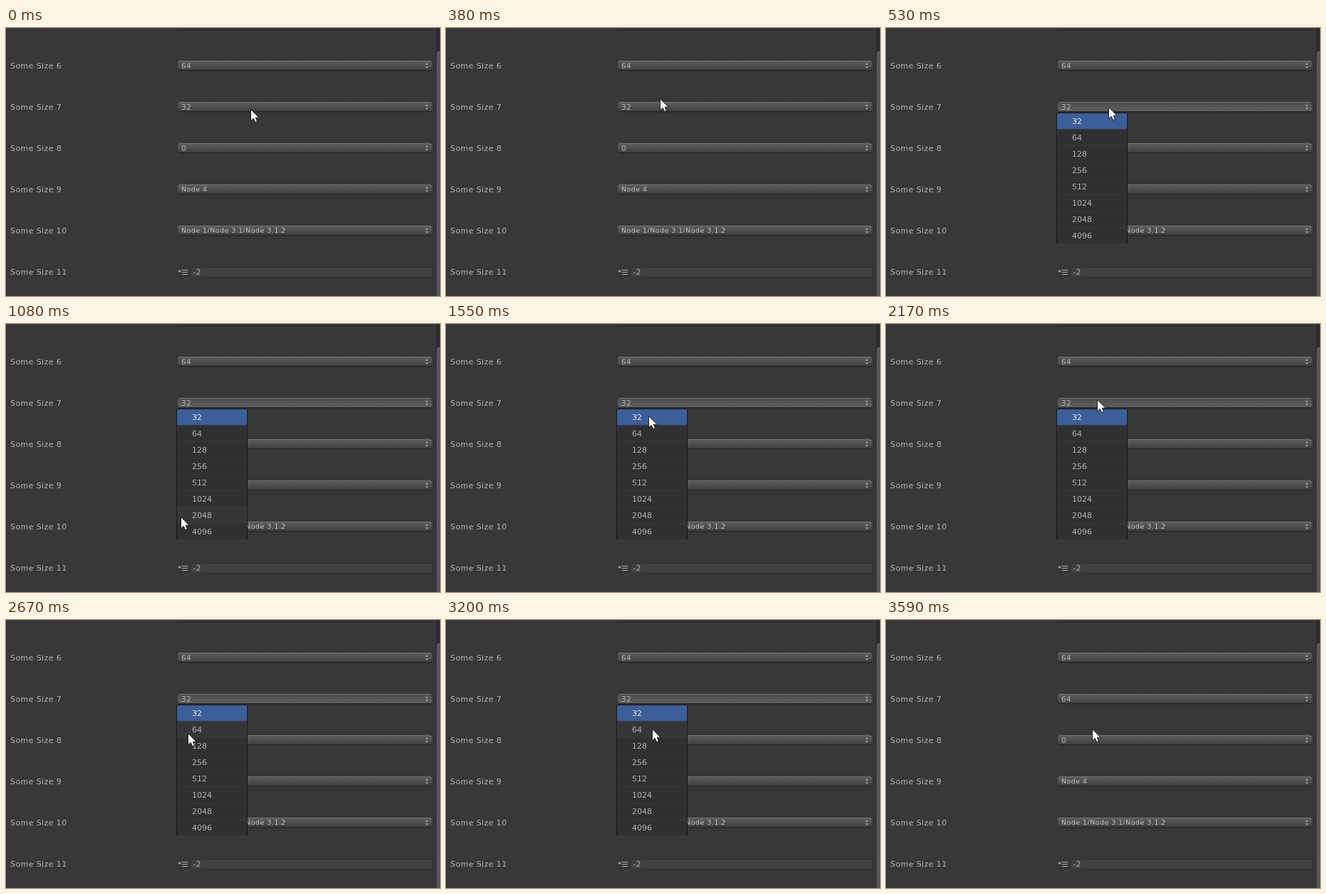
Write an HTML page that moves like this. It is 609 px wide and 377 px high and loops after 4430 ms.

```html
<!DOCTYPE html>
<html lang="en">
<head>
<meta charset="utf-8">
<title>Size popup</title>
<style>
html, body { margin: 0; width: 100%; height: 100%; overflow: hidden; background: #383838; }
svg { display: block; width: 609px; height: 377px; }
text { font: 11px "DejaVu Sans", sans-serif; fill: #b4b4b4; white-space: pre; }
.label { letter-spacing: .4px; }
.value { font-size: 10.5px; letter-spacing: .2px; }
.node { font-size: 9.5px; letter-spacing: .44px; fill: #c4c4c4; }
rect { shape-rendering: crispEdges; }
.round { shape-rendering: auto; }
</style>
</head>
<body>
<svg id="stage" viewBox="0 0 609 377">
  <defs>
    <linearGradient id="idle" x2="0" y2="1">
      <stop stop-color="#5e5e5e"/><stop offset="1" stop-color="#404040"/>
    </linearGradient>
    <linearGradient id="pressed" x2="0" y2="1">
      <stop stop-color="#4d4d4d"/><stop offset="1" stop-color="#5e5e5e"/>
    </linearGradient>
    <linearGradient id="thumb">
      <stop stop-color="#5c5c5c"/><stop offset="1" stop-color="#484848"/>
    </linearGradient>
  </defs>
</svg>
<script>
const LOOP = 4430, OPEN = 530, CLOSE = 3510, COMMIT = 3590;
const TICK = 78, LEAD = 16; // the pointer is sampled once per tick
const GAP = 58, ITEM = 23, ITEMS = 8, MENU_TOP = 120;

// key points of the pointer: tick, x, y
const KEYS = [
  [0, 343, 114], [5, 300, 99], [7, 312, 111], [10, 312, 111],
  [15, 232, 290], [17, 223, 240], [20, 284, 129], [22, 346, 168],
  [26, 215, 184], [28, 296, 106], [29, 338, 126], [31, 255, 159],
  [32, 274, 162], [34, 255, 159], [35, 229, 160], [38, 319, 149],
  [40, 254, 155], [41, 289, 153]
];

const stage = document.getElementById("stage");

function add(parent, tag, attrs, content) {
  const el = document.createElementNS("http://www.w3.org/2000/svg", tag);
  for (const key in attrs) el.setAttribute(key, attrs[key]);
  if (content !== undefined) el.textContent = content;
  parent.append(el);
  return el;
}

const box = (parent, x, y, width, height, fill) =>
  add(parent, "rect", { x, y, width, height, fill });
const write = (parent, x, y, content, cls = "") =>
  add(parent, "text", { x, y, class: cls }, content);

function popup(mid, value, cls) {
  const round = { x: 241, y: mid - 7, width: 357, rx: 3, class: "round" };
  add(stage, "rect", { ...round, height: 14.5, fill: "#262626" });
  const face = add(stage, "rect", { ...round, height: 13, fill: "url(#idle)" });
  box(stage, 243, mid - 7, 353, 1, "#747474");
  add(stage, "path", {
    d: `M588.5 ${mid - 1}l2 -3l2 3zM588.5 ${mid + 1}l2 3l2 -3z`,
    fill: "#a0a0a0"
  });
  const text = write(stage, 246, mid + (cls === "node" ? 3 : 4), value, cls);
  return { face, text };
}

function field(mid, value) {
  add(stage, "path", { d: `M241 ${mid - 2}h5l-2.5 3z`, fill: "#b4b4b4" });
  for (const dy of [-3, 0, 3]) box(stage, 247, mid + dy, 8, 1, "#a8a8a8");
  box(stage, 259, mid - 7, 340, 15, "#303030");
  box(stage, 260, mid - 6, 338, 13, "#414141");
  write(stage, 262.5, mid + 4, value);
}

box(stage, 603, 0, 6, 377, "#2b2b2b");
add(stage, "rect", {
  x: 604, y: 32, width: 12, height: 400, rx: 5, class: "round", fill: "url(#thumb)"
});

const values = ["", "64", "32", "0", "Node 4", "Node 1/Node 3.1/Node 3.1.2"];
const popups = values.map((v, i) =>
  popup(i * GAP - 5, v, v.startsWith("Node") ? "node" : "value"));
for (let i = 1; i < 7; i++) write(stage, 6, i * GAP - 1, "Some Size " + (i + 5), "label");
field(6 * GAP - 5, "-2");

const menu = add(stage, "g", {});
box(menu, 239, MENU_TOP - 1, 100, ITEMS * ITEM, "#191919");
box(menu, 240, MENU_TOP, 98, ITEMS * ITEM - 2, "#373737");
const items = Array.from({ length: ITEMS }, (_, i) => {
  const top = MENU_TOP + i * ITEM;
  const back = box(menu, 240, top, 98, ITEM - 1, "#303030");
  const text = write(menu, 261, top + 15, 32 * 2 ** i);
  if (!i) text.style.fill = "#f0f0f0";
  return back;
});

const pointer = add(stage, "path", {
  d: "M.5 .5V16.7L4.2 13.3L6.6 18.6L9.4 17.4L7.2 12.2H12Z",
  fill: "#fff", stroke: "#111", "stroke-width": .9, "stroke-linejoin": "round"
});

// Slope at a key: flat at turns and rests, so the curve never overshoots.
function slope(i, axis) {
  if (i === 0 || i === KEYS.length - 1) return 0;
  const [a, b, c] = KEYS.slice(i - 1, i + 2);
  const before = (b[axis] - a[axis]) / (b[0] - a[0]);
  const after = (c[axis] - b[axis]) / (c[0] - b[0]);
  return before * after > 0 ? 2 * before * after / (before + after) : 0;
}

function along(tick, axis) {
  const next = KEYS.findIndex(key => key[0] > tick);
  if (next < 0) return KEYS.at(-1)[axis];
  const a = KEYS[next - 1], b = KEYS[next];
  const span = b[0] - a[0], u = (tick - a[0]) / span, v = 1 - u;
  const ease = u * u * (3 - 2 * u);
  return a[axis] + (b[axis] - a[axis]) * ease
    + span * u * v * (v * slope(next - 1, axis) - u * slope(next, axis));
}

function draw(t) {
  const tick = Math.floor((t + LEAD) / TICK);
  const x = Math.round(along(tick, 1)), y = Math.round(along(tick, 2));
  pointer.setAttribute("transform", `translate(${x} ${y})`);

  menu.style.display = t >= OPEN && t < CLOSE ? "" : "none";
  const over = x >= 240 && x < 338 ? Math.floor((y - MENU_TOP) / ITEM) : -1;
  items.forEach((back, i) =>
    back.setAttribute("fill", !i ? "#3d5f99" : i === over ? "#363636" : "#303030"));

  const { face, text } = popups[2];
  face.setAttribute("fill", t >= OPEN && t < COMMIT ? "url(#pressed)" : "url(#idle)");
  text.textContent = t >= COMMIT ? "64" : "32";
}

const start = performance.now();
function run() {
  draw((performance.now() - start) % LOOP);
  requestAnimationFrame(run);
}
run();
</script>
</body>
</html>
```
